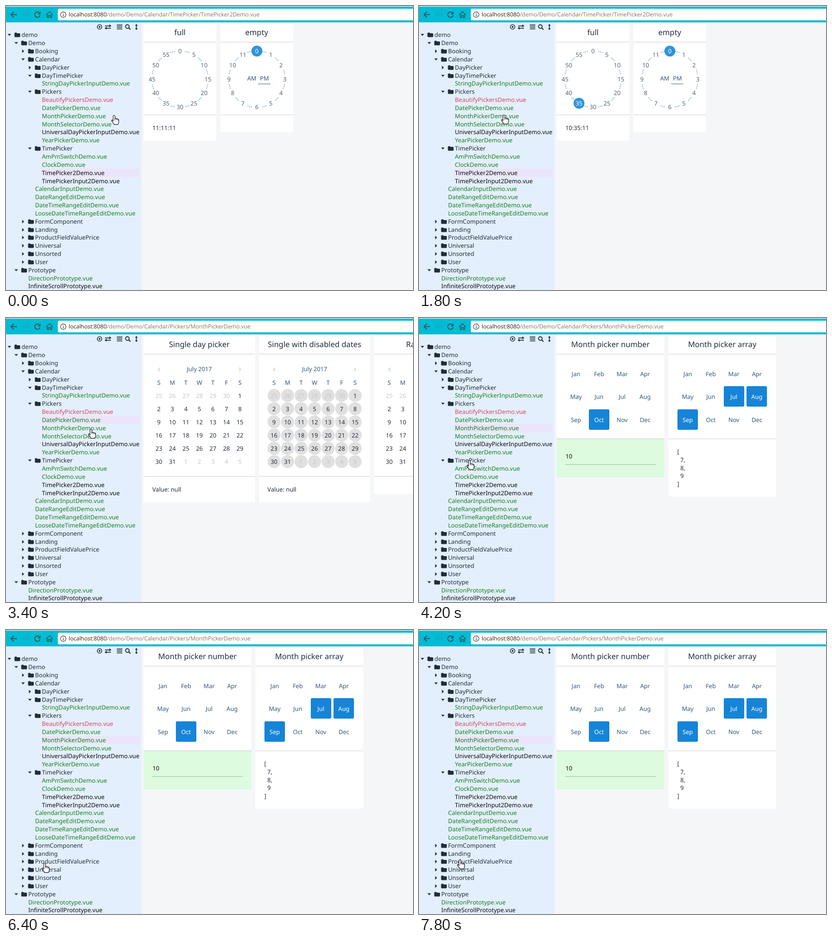
Animation of 896x625 px, one loop 8 s. Source, as an HTML page:

```html
<!DOCTYPE html>
<html lang="en">
<head>
<meta charset="utf-8">
<title>Component demo browser</title>
<style>
html, body { margin: 0; width: 100%; height: 100%; overflow: hidden; background: #f5f6f8; }
svg { display: block; width: 896px; height: 625px; font: 13.1px "Noto Sans", sans-serif; text-rendering: geometricPrecision; }
</style>
</head>
<body>
<svg id="stage" viewBox="0 0 896 625"></svg>
<script>
const LOOP = 8000, STEP = 200, ROW = 17.84;
const INK = '#222d3b', BLUE = '#2f5a7a', PICK = '#1684d7', DOT = '#2f94dc', LINE = '#cfcfcf';
const COLORS = { g: '#15811b', r: '#d14a61', k: '#0c0c0c' };
const stage = document.getElementById('stage');

const rect = (x, y, w, h, fill, r = 0) =>
  `<rect x="${x}" y="${y}" width="${w}" height="${h}" rx="${r}" fill="${fill}"/>`;
// Baselines sit on whole pixels, as in page layout
const text = (x, y, s, fill = INK, anchor = 'start', size = 13.1) =>
  `<text x="${x}" y="${Math.round(y)}" fill="${fill}" text-anchor="${anchor}" font-size="${size}">${s}</text>`;
const mid = (x, y, s, fill, size) => text(x, y, s, fill, 'middle', size);
const disc = (x, y, r, fill) => `<circle cx="${x}" cy="${y}" r="${r}" fill="${fill}"/>`;
const stroke = (d, color, w = 2) =>
  `<path d="${d}" fill="none" stroke="${color}" stroke-width="${w}"/>`;
const fill = (d, color = INK) => `<path d="${d}" fill="${color}"/>`;
const move = (x, y, s) => `<g transform="translate(${x} ${y})">${s}</g>`;
const hline = (x, y, w, color = LINE) => rect(x, y, w, 1, color);

// Browser bar

const urls = {
  time: 'TimePicker/TimePicker2Demo.vue',
  date: 'Pickers/DatePickerDemo.vue',
  month: 'Pickers/MonthPickerDemo.vue'
};

function browserBar(url) {
  const c = '#35555f';
  return rect(0, 0, 896, 36, '#00bcd4') + rect(0, 0, 896, 1.5, '#dfe5e7') +
    stroke('M24 19H11.5M17.5 12.5L11 19L17.5 25.5', c) +
    stroke('M36 19H48.5M42.5 12.5L49 19L42.5 25.5', '#27a7ba') +
    stroke('M74.2 15.6A6 6 0 1 0 75 20.5', c) + fill('M76 12V18.4H69.6Z', c) +
    stroke('M88.5 19.5L95.8 12.5L103 19.5M91 18V25.5H94V20.5H97.6V25.5H100.6V18', c, 1.7) +
    rect(114, 6, 790, 25.5, '#fff', 2) +
    `<circle cx="126" cy="19" r="6" fill="none" stroke="#555" stroke-width="1.4"/>` +
    rect(125.2, 15.6, 1.6, 1.6, '#555') + rect(125.2, 18.2, 1.6, 4.2, '#555') +
    `<text x="138" y="23" font-family="Open Sans, sans-serif" font-size="12.43" fill="#222">localhost:8080` +
    `<tspan fill="#777">/demo/Demo/Calendar/${urls[url]}</tspan></text>`;
}

// File tree: depth, mark (+ closed, - open, or file colour), name, parent key

const tree = `0 - demo|1 - Demo|2 + Booking|2 - Calendar|3 + DayPicker|3 - DayTimePicker
3 g StringDayPickerInputDemo.vue|3 - Pickers|3 r BeautifyPickersDemo.vue|3 g DatePickerDemo.vue
3 g MonthPickerDemo.vue|3 g MonthSelectorDemo.vue|3 k UniversalDayPickerInputDemo.vue
3 g YearPickerDemo.vue|3 - TimePicker|3 g AmPmSwitchDemo.vue time|3 g ClockDemo.vue time
3 k TimePicker2Demo.vue time|3 k TimePickerInput2Demo.vue time|2 g CalendarInputDemo.vue
2 g DateRangeEditDemo.vue|2 g DateTimeRangeEditDemo.vue|2 g LooseDateTimeRangeEditDemo.vue
2 + FormComponent|2 + Landing|2 + ProductFieldValuePrice
2 g ProductFieldValuePriceInputDemo.vue price|2 + Universal|2 + Unsorted|2 + User|1 - Prototype
1 g DirectionPrototype.vue|1 k InfiniteScrollPrototype.vue|1 k TwoPanelPrototype.vue
1 + Styles|0 k TreeRoot.vue`.split(/[|\n]/).map(s => {
  const [depth, mark, name, parent] = s.split(' ');
  return { x: 34 + 15 * depth, mark, name, parent };
});

const folder = 'M0 1.6Q0 0 1.6 0H4Q5.6 0 5.6 1.6H11Q12.6 1.6 12.6 3.2V8.4Q12.6 10 11 10H1.6Q0 10 0 8.4Z';

function treeIcons() {
  return `<circle cx="206" cy="46" r="5" fill="none" stroke="${INK}" stroke-width="1.6"/>` +
    disc(206, 46, 2, INK) +
    stroke('M218 43.8H228M221 48.8H231', INK, 1.7) +
    fill('M227.5 40.5L232 43.8L227.5 47ZM221.5 45.6L217 48.8L221.5 52Z') +
    stroke('M244 42H256M244 46.2H256M244 50.4H256', INK, 1.9) +
    `<circle cx="267.2" cy="45.2" r="4" fill="none" stroke="${INK}" stroke-width="1.9"/>` +
    stroke('M270 48L274 52', INK, 2.2) +
    stroke('M287 42V51', INK, 1.7) +
    fill('M284 43.5L287 39.5L290 43.5ZM284 49L287 53L290 49Z');
}

function sidebar(page, open, grow) {
  const selected = urls[page].split('/')[1];
  const rows = tree.filter(n => !n.parent || open[n.parent]);
  const body = rows.map((n, i) => {
    const y = Math.round(68.4 + ROW * i);
    if (COLORS[n.mark]) {
      const back = n.name === selected ? rect(n.x, y - 14, 294 + grow - n.x, 18, '#ece4fb') : '';
      return back + text(n.x, y, n.name, COLORS[n.mark]);
    }
    const key = { TimePicker: 'time', ProductFieldValuePrice: 'price' }[n.name];
    const isOpen = key ? open[key] : n.mark === '-';
    const caret = isOpen ? 'M-4 -2H4L0 2.3Z' : 'M-2 -4V4L2.4 0Z';
    return move(n.x - 26.5, y - 4.5, fill(caret)) +
      move(n.x - 15.4, y - 9.6, fill(folder)) + text(n.x, y, n.name);
  });
  const height = 23 + ROW * rows.length;
  return rect(0, 36, 298.5 + grow, height, '#e4effd') + move(grow, 0, treeIcons()) + body.join('');
}

// Pages

const card = (x, w, bottom, title, divider) =>
  rect(x, 38, w, bottom - 38, '#fff') + mid(x + w / 2, 64, title, INK, 16.87) +
  hline(x, 79, w) + hline(x, divider, w);

function dial(cx, unit, chosen) {
  const cy = 161, polar = (deg, r) => {
    const a = deg * Math.PI / 180;
    return [cx + r * Math.sin(a), cy - r * Math.cos(a)];
  };
  let s = '';
  for (let i = 0; i < 12; i++) {
    for (const d of [11.5, 15, 18.5]) s += disc(...polar(i * 30 + d, 62), 1, '#5596cb');
    const [x, y] = polar(i * 30, 61.5), on = i === chosen;
    if (on) s += disc(x, y - 0.3, 12, DOT);
    s += mid(x, y + 4.7, i * unit, on ? '#fff' : '#59616b');
  }
  return s;
}

function timePage(clicked) {
  return card(303, 160, 296, 'full', 239) + dial(383, 5, clicked ? 7 : -1) +
    text(322.3, 273, clicked ? '10:35:11' : '11:11:11') +
    card(472, 160, 278, 'empty', 239) + dial(552.3, 1, 0) +
    mid(541, 163.6, 'AM', BLUE) + mid(569, 163.6, 'PM', BLUE) + hline(555, 171, 27, BLUE);
}

function calendar(x, disabled) {
  const col = i => x + 33.5 + 29.75 * i, pale = '#c6c6c6';
  let s = mid(col(3), 116.5, 'July 2017', BLUE) +
    stroke(`M${x + 35.5} 109.5L${x + 32} 113.3L${x + 35.5} 117`, '#bbb', 1.2) +
    stroke(`M${x + 210} 109.5L${x + 213.5} 113.3L${x + 210} 117`, '#bbb', 1.2);
  [...'SMTWTFS'].forEach((d, i) => s += mid(col(i), 146.5, d, BLUE));
  for (let i = 0; i < 42; i++) {
    const cx = col(i % 7), cy = 171 + 29.1 * Math.floor(i / 7), day = i - 5;
    const label = day < 1 ? day + 30 : day > 31 ? day - 31 : day;
    if (disabled) s += disc(cx, cy - 0.5, 14.3, '#e0e0e0');
    s += mid(cx, cy + 4.6, label, label === day ? INK : pale);
  }
  return s;
}

function datePage() {
  return card(303, 245, 405, 'Single day picker', 348) + calendar(303, false) +
    text(322, 382, 'Value: null') +
    card(557, 244.5, 405, 'Single with disabled dates', 348) + calendar(556.6, true) +
    text(575.6, 382, 'Value: null') +
    card(810, 244.5, 387, 'Range picker', 348) + calendar(810.2, false);
}

const months = 'Jan Feb Mar Apr May Jun Jul Aug Sep Oct Nov Dec'.split(' ');

const monthGrid = (x, picks) => months.map((m, i) => {
  const cx = x + 42.6 + 50.75 * (i % 4), cy = 122 + 50.75 * Math.floor(i / 4), on = picks.includes(i + 1);
  const box = rect(Math.round(cx - 22.5), Math.round(cy - 22.5), 45, 45, PICK, 3);
  return (on ? box : '') + mid(cx, cy + 5.5, m, on ? '#fff' : BLUE);
}).join('');

function monthPage() {
  return card(303, 237, 351, 'Month picker number', 265.5) + rect(303, 266, 237, 85, '#ddfbde') +
    hline(303, 265.5, 237) + monthGrid(303, [10]) +
    text(322.5, 308.6, '10', '#111') + hline(322, 322, 199, '#a3b5ab') +
    card(549, 237, 393, 'Month picker array', 265.5) + monthGrid(549, [7, 8, 9]) +
    ['[', '7,', '8,', '9', ']'].map((s, i) => text(i % 4 ? 575.2 : 568.5, 298.9 + ROW * i, s)).join('');
}

const pages = { time: timePage, date: datePage, month: monthPage };

// Pointer: time, x, y of the fingertip

const track = [
  [0, 238, 240], [200, 235, 238], [400, 275, 222], [600, 325, 202], [800, 350, 204],
  [1000, 352, 211], [1200, 352, 212], [1400, 325, 223], [1600, 240, 243], [1800, 187, 239],
  [2400, 188, 224], [2800, 188, 225], [3000, 187, 243], [3400, 187, 244], [3600, 186, 246],
  [3800, 168, 266], [4200, 111, 313], [4400, 111, 313], [4600, 111, 311], [5400, 111, 311],
  [6000, 88, 508], [6200, 88, 508], [6400, 85, 513], [6800, 85, 513], [7200, 86, 512],
  [7400, 86, 512], [7600, 90, 505], [8000, 90, 505]
];

function pointer(t) {
  const i = track.findIndex(k => k[0] > t), [t0, x0, y0] = track[i - 1], [t1, x1, y1] = track[i];
  const f = (t - t0) / (t1 - t0);
  const hand = 'M-2 2Q0 -1 2 2V8Q4 6.5 5.4 8.4Q7.2 7.3 8.3 9.2Q10.3 8.8 10.3 11.5V15' +
    'Q10 18 8.5 20.7H-.5Q-1 18 -5 13.5Q-6 11.2 -4.4 10.8Q-3.4 10.8 -2 13Z';
  return move(x0 + (x1 - x0) * f, y0 + (y1 - y0) * f,
    `<path d="${hand}" fill="#fff" stroke="#111" stroke-width="1.2"/>` +
    stroke('M2 8V11.5M5.4 8.5V11.5M8.3 9.5V12', '#111', 1));
}

function draw(t) {
  const url = t < 2600 ? 'time' : t < 3400 ? 'date' : 'month';
  const page = t < 2800 ? 'time' : t < 3600 ? 'date' : 'month';
  const open = { time: t < 4800 || t >= 5400, price: t >= 6600 && t < 7800 };
  const grow = open.price ? 8 : 0;
  stage.innerHTML = rect(0, 0, 896, 625, '#f5f6f8') + browserBar(url) +
    sidebar(page, open, grow) + move(grow, 0, pages[page](t >= 1000)) + pointer(t);
}

let last = -1;
function tick(now) {
  const t = Math.floor(now % LOOP / STEP) * STEP;
  if (t !== last) draw(last = t);
  requestAnimationFrame(tick);
}
draw(0);
requestAnimationFrame(tick);
</script>
</body>
</html>
```
